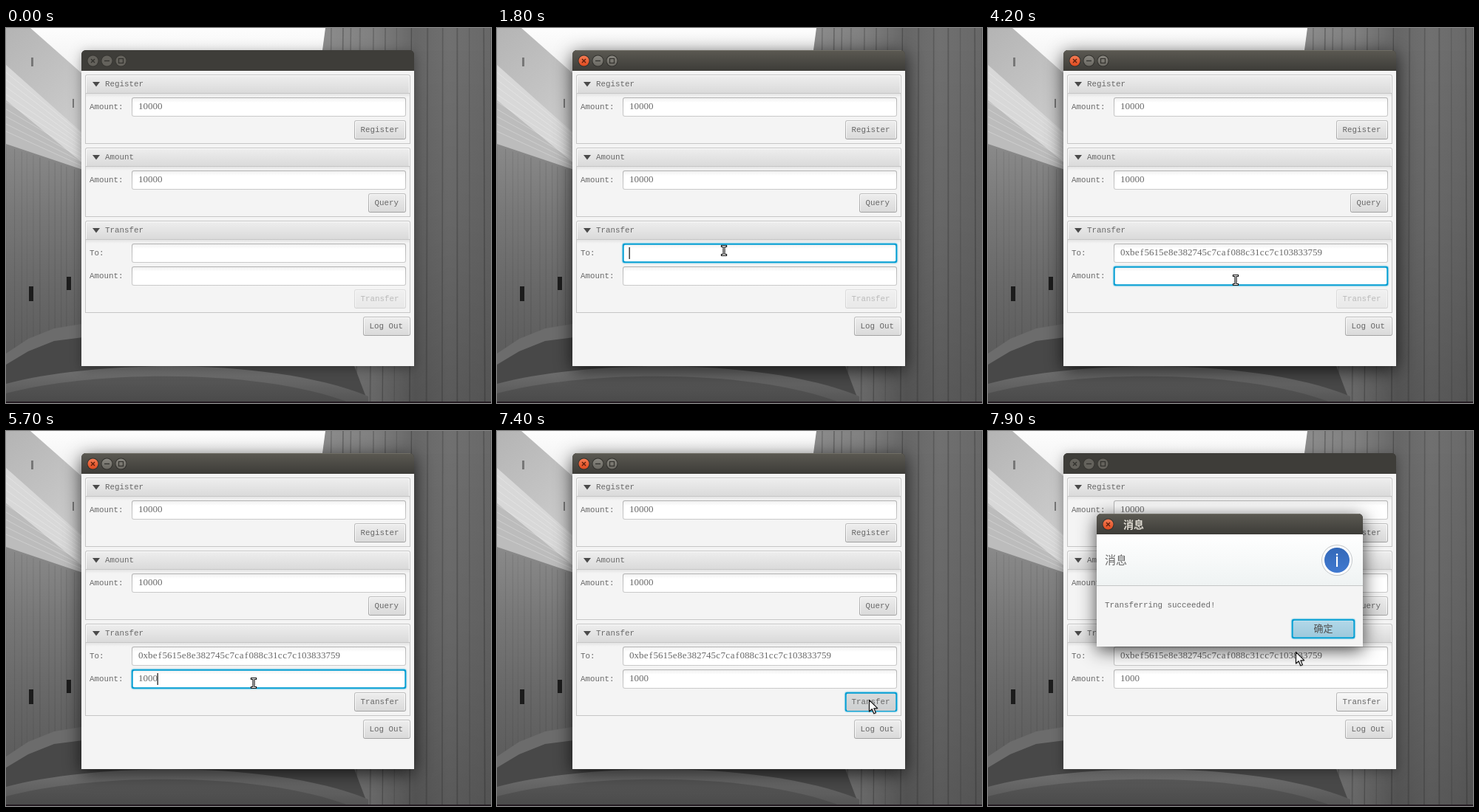
These frames come from a looping animation (656 by 508 pixels, 8000 ms). An HTML page with a canvas:

```html
<!DOCTYPE html>
<html lang="en">
<head>
<meta charset="utf-8">
<title>Transfer dialog</title>
<style>
html, body { margin: 0; width: 100%; height: 100%; overflow: hidden; background: #555; }
canvas { display: block; width: 656px; height: 508px; }
</style>
</head>
<body>
<canvas id="stage" width="656" height="508"></canvas>
<script>
const W = 656, H = 508, LOOP = 8000, STEP = 100, PITCH = 6.5;
const MONO = '10.83px "Liberation Mono", monospace';
const SERIF = '13px "Liberation Serif", serif';
const CJK = '"Noto Sans CJK SC", "Noto Sans CJK", sans-serif';
const INK = '#686868', ACCENT = '#039ed3';
const ADDRESS = '0xbef5615e8e382745c7caf088c31cc7c103833759';
const FIELD_TOPS = [94, 193, 292, 323];

// Pointer stops: time, x, y. The pointer jumps, as in a screen recording.
const POINTER = [
  [1100, 646, 158], [1200, 600, 178], [1300, 552, 205], [1400, 500, 232],
  [1500, 425, 256], [1600, 345, 279], [1700, 307, 301], [2000, 303, 315],
  [2200, 306, 326], [2300, 318, 336], [2400, 330, 340], [2500, 335, 341],
  [6300, 354, 345], [6400, 415, 353], [6500, 475, 357], [6600, 512, 358],
  [6700, 520, 358], [7100, 503, 364], [7800, 455, 325], [7900, 416, 299]
];
const CARET_TO = [[1800, 2300], [2400, 2900], [3400, 3600]];
const CARET_AMOUNT = [[3700, 4200], [4700, 6200], [6700, 7200]];

const stage = document.getElementById('stage').getContext('2d');
let g = stage;

const within = (t, spans) => spans.some(([a, b]) => t >= a && t < b);
const pointerAt = t => POINTER.filter(p => p[0] <= t).pop();

// Hover highlights trail the pointer by one step.
function hovered(t, x, y, w, h) {
  const stop = pointerAt(t - STEP);
  return !!stop && stop[1] >= x && stop[1] < x + w && stop[2] >= y && stop[2] < y + h;
}

function vertical(y, h, ...colors) {
  const fill = g.createLinearGradient(0, y, 0, y + h);
  colors.forEach((c, i) => fill.addColorStop(i / (colors.length - 1), c));
  return fill;
}

function box(x, y, w, h, radius, fill) {
  g.fillStyle = fill;
  g.beginPath();
  g.roundRect(x, y, w, h, radius);
  g.fill();
}

function poly(fill, ...p) {
  g.fillStyle = fill;
  g.beginPath();
  for (let i = 0; i < p.length; i += 2) g.lineTo(p[i], p[i + 1]);
  g.closePath();
  g.fill();
}

function stroke(color, width, ...p) {
  g.strokeStyle = color;
  g.lineWidth = width;
  g.beginPath();
  for (let i = 0; i < p.length; i += 4) {
    g.moveTo(p[i], p[i + 1]);
    g.lineTo(p[i + 2], p[i + 3]);
  }
  g.stroke();
}

function disc(x, y, r, fill) {
  g.fillStyle = fill;
  g.beginPath();
  g.arc(x, y, r, 0, 7);
  g.fill();
}

function text(s, x, y, font = MONO, color = INK, align = 'left') {
  g.font = font;
  g.fillStyle = color;
  g.textAlign = align;
  g.fillText(s, x, y);
}

function digits(s, x, y) {
  [...s].forEach((c, i) => text(c, x + (i + 0.5) * PITCH, y, SERIF, INK, 'center'));
}

function random(seed) {
  return () => (seed = (seed * 16807) % 2147483647) / 2147483647;
}

// Soft floor band whose upper edge is one curve from (0, y) to (right, end)
function arch(fill, y, lift, right, end) {
  g.fillStyle = fill;
  g.beginPath();
  g.moveTo(0, y);
  g.bezierCurveTo(right * 0.26, y - lift, right * 0.74, y - lift - 2, right, end);
  g.lineTo(right, H);
  g.lineTo(0, H);
  g.fill();
}

function paintBackdrop() {
  const rnd = random(71);
  g.fillStyle = vertical(0, 60, '#fdfdfd', '#f0f0f0');
  g.fillRect(0, 0, W, H);

  // Pale sloping wall on the left
  const pale = g.createLinearGradient(0, 0, 110, 120);
  pale.addColorStop(0, '#b4b4b4');
  pale.addColorStop(1, '#cccccc');
  poly(pale, 0, 0, 33, 0, 110, 68, 110, 200, 0, 200);
  poly('#d8d8d8', 0, 50, 110, 148, 110, 188, 0, 98);
  poly('#bcbcbc', 0, 98, 110, 188, 110, 195, 0, 157);
  for (let i = 0; i < 9; i++)
    stroke('rgba(255,255,255,.25)', 1, 0, 60 + i * 10, 110, 150 + i * 5);
  box(34, 40, 3, 12, 0, '#777');
  box(90, 96, 2, 12, 0, '#777');

  // Dark left wall with boards and openings
  poly(vertical(157, 290, '#8a8a8a', '#777777', '#686868', '#5c5c5c'),
    0, 157, 110, 194, 110, 470, 0, 470);
  for (let i = 0; i < 13; i++) {
    const x = i * 9 + rnd() * 4;
    stroke(`rgba(40,40,40,${0.05 + rnd() * 0.15})`, 1, x, 160 + x * 0.34, x, 440);
  }
  box(31, 350, 6, 20, 0, '#1c1c1c');
  box(82, 337, 6, 18, 0, '#1c1c1c');

  // Right wall of vertical boards
  const wall = g.createLinearGradient(428, 0, W, 0);
  [[0, '#8c8c8c'], [0.3, '#808080'], [0.55, '#666666'], [0.75, '#707070'], [1, '#686868']]
    .forEach(([at, c]) => wall.addColorStop(at, c));
  poly(wall, 432, 0, W, 0, W, H, 440, H, 428, 30);
  for (let x = 440; x < W; x += 9 + rnd() * 13) {
    const lean = (x - 610) * 0.04;
    stroke(`rgba(25,25,25,${0.1 + rnd() * 0.25})`, 1 + rnd(), x, 0, x + lean, H);
  }
  g.fillStyle = vertical(0, H, 'rgba(0,0,0,0)', 'rgba(0,0,0,.08)', 'rgba(0,0,0,.2)');
  g.fillRect(428, 31, W, H);

  // Curved walls at the bottom
  poly('#6c6c6c', 0, 441, 30, 421, 65, 407, 120, 398, 120, H, 0, H);
  poly('#484848', 0, 456, 30, 438, 65, 424, 120, 417, 470, 455, 490, H, 0, H);
  arch(vertical(458, 50, '#727272', '#545454'), 482, 33, 490, 499);
  arch(vertical(470, 38, '#585858', '#4a4a4a'), 495, 32, 466, H);
  g.fillStyle = '#241c22';
  g.fillRect(0, 506, W, 2);
}

function titleButton(x, y, glyph, active) {
  const close = glyph === 'x';
  disc(x, y, 8, active ? '#33322e' : '#383733');
  disc(x, y, 7, active
    ? (close ? vertical(y - 7, 14, '#f47c54', '#df4a1f') : vertical(y - 7, 14, '#898780', '#6a6862'))
    : '#64625c');
  const ink = active && close ? '#5a1d0c' : '#33322e';
  if (close) stroke(ink, 1.3, x - 2.5, y - 2.5, x + 2.5, y + 2.5, x + 2.5, y - 2.5, x - 2.5, y + 2.5);
  if (glyph === '-') stroke(ink, 1.3, x - 3.5, y, x + 3.5, y);
  if (glyph === 'o') {
    g.strokeStyle = ink;
    g.lineWidth = 1.2;
    g.strokeRect(x - 3, y - 3, 6, 6);
  }
}

function frame(x, y, w, h, active) {
  g.save();
  g.shadowColor = active ? 'rgba(0,0,0,.72)' : 'rgba(0,0,0,.35)';
  g.shadowBlur = active ? 24 : 16;
  g.shadowOffsetY = active ? 5 : 3;
  box(x, y, w, h, [6, 6, 0, 0], '#3c3b37');
  g.restore();
  box(x, y, w, 28, [6, 6, 0, 0], active ? vertical(y, 28, '#5b5952', '#3d3c38') : '#3e3d39');
  if (active) stroke('#706e65', 1, x + 5, y + 0.5, x + w - 5, y + 0.5);
  g.fillStyle = '#f4f4f4';
  g.fillRect(x, y + 28, w, h - 28);
}

function focusRing(x, y, w, h) {
  box(x - 1.4, y - 1.4, w + 2.8, h + 2.8, 4, 'rgba(3,158,211,.2)');
  box(x - 0.3, y - 0.3, w + 0.6, h + 0.6, 3, ACCENT);
}

function button(label, x, y, w, state = {}) {
  const h = 26;
  if (state.focused) focusRing(x, y, w, h);
  else box(x, y, w, h, 3, vertical(y, h, '#bebebe', '#a2a2a2'));
  const [top, bottom] = state.armed ? ['#d9dcdd', '#cdcfd0']
    : state.hover ? ['#f8f8f8', '#e7e7e7'] : ['#eeeeee', '#d9d9d9'];
  const edge = state.focused ? 1.7 : 1;
  box(x + edge, y + edge, w - 2 * edge, h - 2 * edge, 2, state.armed ? top : '#fafafa');
  box(x + 2, y + 2, w - 4, h - 3, 1.5, vertical(y, h, top, bottom));
  text(label, x + 8.5, y + 16);
  if (state.disabled) box(x, y, w, h, 0, 'rgba(244,244,244,.6)');
}

function field(label, y, value, focused, caret) {
  const x = 170, w = 371, h = 26;
  text(label, 113, y + 16);
  if (focused) focusRing(x, y, w, h);
  else box(x, y, w, h, 3, vertical(y, h, '#b2b2b2', '#cacaca'));
  const edge = focused ? 1.7 : 1;
  box(x + edge, y + edge, w - 2 * edge, h - 2 * edge, 2, vertical(y, 7, '#eeeeee', '#ffffff'));
  digits(value, 179, y + 16);
  if (caret) {
    g.fillStyle = '#222';
    g.fillRect(178.5 + value.length * PITCH, y + 5, 1.3, 16);
  }
}

function pane(title, y, h, hover) {
  box(107, y, 440, h, [3, 3, 0, 0], '#c6c6c6');
  g.fillStyle = '#f4f4f4';
  g.fillRect(108, y + 26, 438, h - 27);
  box(108, y + 1, 438, 24, [2, 2, 0, 0], '#fbfbfb');
  const face = hover ? ['#f9f9f9', '#e8e8e8'] : ['#efefef', '#dadada'];
  box(109, y + 2, 436, 23, [2, 2, 0, 0], vertical(y, 25, ...face));
  g.fillStyle = vertical(y + 26, 5, '#e4e4e4', '#f4f4f4');
  g.fillRect(108, y + 26, 438, 5);
  poly('#4a4a4a', 117, y + 10, 127, y + 10, 122, y + 16.5);
  text(title, 134, y + 16);
}

function dialog(active) {
  frame(147, 112, 360, 180, active);
  titleButton(162.5, 126.5, 'x', active);
  text('消息', 183, 132, `bold 14px ${CJK}`, active ? '#dfdbd2' : '#807d78');
  g.fillStyle = vertical(140, 69, '#ffffff', '#eff3f3');
  g.fillRect(147, 140, 360, 69);
  g.fillStyle = '#c4c6c6';
  g.fillRect(147, 209, 360, 1);
  text('消息', 158, 180, `300 15px ${CJK}`);
  disc(472, 175, 21, '#c5c8ca');
  disc(472, 175, 20, '#fff');
  disc(472, 175, 17, vertical(158, 34, '#3368b8', '#4079d0'));
  text('i', 472, 184, '26px "Open Sans", sans-serif', '#fff', 'center');
  text('Transferring succeeded!', 158, 239);
  if (active) focusRing(411, 255, 85, 26);
  else box(411, 255, 85, 26, 3, '#83adbd');
  box(412.7, 256.7, 81.6, 22.6, 2, '#c3e0ec');
  box(413, 258, 81, 21, 2, vertical(258, 21, '#b1d7e8', '#9dc9dc'));
  text('确定', 453.5, 272, `300 13px ${CJK}`, '#505050', 'center');
}

function pointer(t) {
  const stop = pointerAt(t);
  if (!stop) return;
  const [, x, y] = stop;
  const overField = t < 7500 && x >= 170 && x < 541 && FIELD_TOPS.some(top => y >= top && y < top + 26);
  g.save();
  g.translate(x, y);
  g.lineJoin = 'round';
  if (overField) {
    const bars = [-2.5, -5.5, 2.5, -5.5, 0, -5.5, 0, 6.5, -2.5, 6.5, 2.5, 6.5];
    g.lineCap = 'square';
    stroke('#111', 3.2, ...bars);
    stroke('#fff', 1, ...bars);
  } else {
    g.shadowColor = 'rgba(0,0,0,.35)';
    g.shadowBlur = 2;
    g.shadowOffsetY = 1;
    poly('#fff', 0.5, 0.5, 0.5, 16, 4.2, 12.7, 6.8, 18.8, 9.4, 17.7, 6.8, 11.8, 11.7, 11.6);
    g.shadowColor = 'transparent';
    g.strokeStyle = '#151515';
    g.lineWidth = 1.2;
    g.stroke();
  }
  g.restore();
}

function draw(t) {
  const active = t >= 1800 && t < 7500;
  const to = t >= 2400 ? ADDRESS : '';
  const typed = t < 5100 ? 0 : Math.min(4, 1 + Math.floor((t - 5100) / 200));
  const titleHover = y => hovered(t, 107, y, 440, 26);
  g.drawImage(backdrop, 0, 0);
  frame(102, 30, 450, 428, active);
  ['x', '-', 'o'].forEach((glyph, i) => titleButton(117.5 + 19 * i, 44.5, glyph, active));

  pane('Register', 63, 94, titleHover(63));
  field('Amount:', 94, '10000');
  button('Register', 471, 125, 70);

  pane('Amount', 162, 94, titleHover(162));
  field('Amount:', 193, '10000');
  button('Query', 490, 224, 51, { hover: hovered(t, 490, 224, 51, 26) });

  pane('Transfer', 261, 125, titleHover(261));
  field('To:', 292, to, t >= 1800 && t < 3600, within(t, CARET_TO));
  field('Amount:', 323, '1000'.slice(0, typed), t >= 3600 && t < 7200, within(t, CARET_AMOUNT));
  button('Transfer', 471, 354, 70, {
    disabled: !typed,
    focused: t >= 7200 && t < 7500,
    armed: t >= 7200 && t < 7500,
    hover: t >= 6500
  });
  button('Log Out', 483, 391, 64);

  if (t >= 7500) dialog(t >= 7600);
  pointer(t);
}

const backdrop = document.createElement('canvas');
backdrop.width = W;
backdrop.height = H;
g = backdrop.getContext('2d');
paintBackdrop();
g = stage;

const start = performance.now();
function tick() {
  const t = (performance.now() - start) % LOOP;
  draw(Math.floor(t / STEP) * STEP);
  requestAnimationFrame(tick);
}
tick();
</script>
</body>
</html>
```
